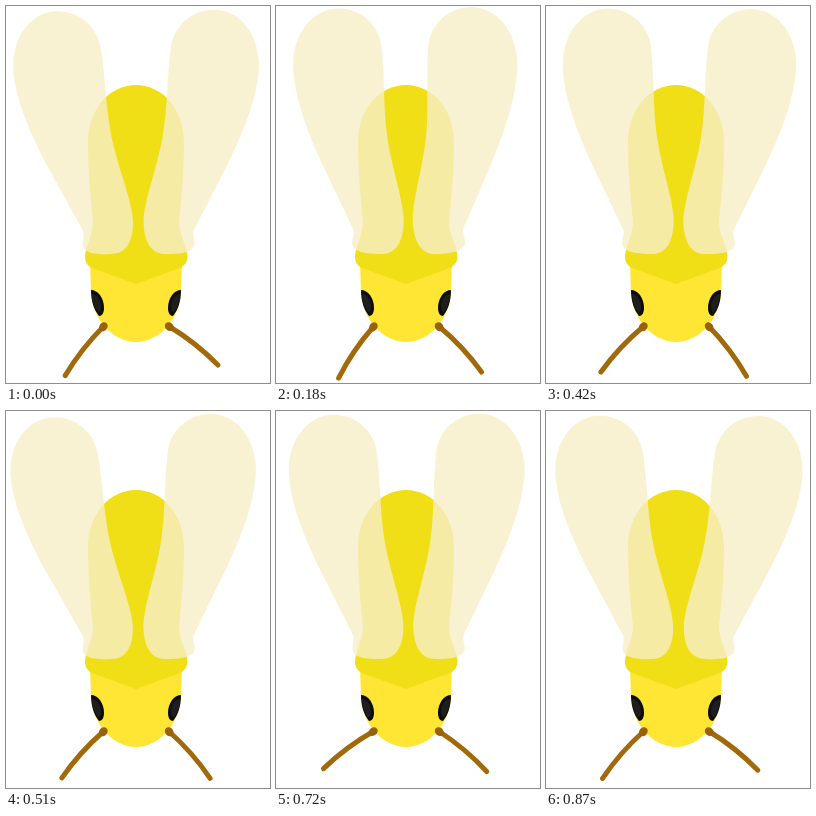
Animation, 264 px wide and 377 px high, one loop 900 ms. Source, as an HTML page with a canvas:

```html
<!DOCTYPE html>
<html lang="en">
<head>
<meta charset="utf-8">
<title>Bee</title>
<style>
  html, body { margin: 0; width: 100%; height: 100%; overflow: hidden; background: #fff; }
  canvas { display: block; }
</style>
</head>
<body>
<canvas id="stage" width="264" height="377"></canvas>
<script>
const ctx = document.getElementById('stage').getContext('2d');
const LOOP = 900, STEP = 30;

// Each part swings between a few turning points [ms, value], easing in and out.
// Wings: x of the outer edge. Antennae: sideways reach of the tip.
const leftWing = swing([50, 5], [310, 29.5], [535, 3], [775, 14]);
const rightWing = swing([120, 25], [450, 14.5], [690, 18], [820, 5]);
const leftAntenna = swing([100, 34.5], [430, 43.5], [560, 42], [720, 51]);
const rightAntenna = swing([40, 50], [345, 35], [500, 42], [780, 49.5]);

function swing(...turns) {
  const [firstMs, first] = turns[0];
  const path = [...turns, [firstMs + LOOP, first]];
  return t => {
    if (t < firstMs) t += LOOP;
    const i = path.findIndex(([ms]) => ms > t);
    const [[t0, a], [t1, b]] = [path[i - 1], path[i]];
    return a + (b - a) * (1 - Math.cos(Math.PI * (t - t0) / (t1 - t0))) / 2;
  };
}

function mirrored(axis, draw) {
  ctx.save();
  ctx.translate(2 * axis, 0);
  ctx.scale(-1, 1);
  draw();
  ctx.restore();
}

const fill = (color, d) => { ctx.fillStyle = color; ctx.fill(new Path2D(d)); };

function wing(edge) {
  ctx.save();
  ctx.translate(104, 228);
  ctx.rotate((edge - 6) / 178);
  ctx.translate(-104, -228);
  fill('rgba(247,239,199,.8)', `M105 248 C120 248 127 236 127 217 C127 196 112 164 105 130
    C99 100 99 72 94 42 C90 19 71 5.5 51 5.5 C25 5.5 6.5 30 6.5 60
    C7 92 26 132 42 162 L77 225 C79 230 76 235 77 240
    C78 247 91 249 105 248 Z`);
  ctx.restore();
}

function antenna(reach) {
  ctx.save();
  ctx.translate(98, 320);
  ctx.rotate(Math.asin(reach / 63.6));
  ctx.strokeStyle = '#a06a0c';
  ctx.lineWidth = 5;
  ctx.lineCap = 'round';
  ctx.beginPath();
  ctx.moveTo(0, 0);
  ctx.quadraticCurveTo(-4, 32, 0, 63);
  ctx.stroke();
  ctx.fillStyle = '#996209';
  ctx.beginPath();
  ctx.ellipse(0, 1, 4, 4.8, 0, 0, 7);
  ctx.fill();
  ctx.restore();
}

function eye() {
  fill('#0c0c0c', 'M85 284 C92 284 98 292 98 302 C98 307 96 310 93 310 C88 304 85 295 85 284 Z');
  fill('#1e1e1e', 'M86 288 C91 288 95 294 95 301 C95 304 94 306 92 306 C88 301 86 295 86 288 Z');
}

function body() {
  fill('#ffe635', 'M84 255 L85 286 C86 312 106 336 130 336 C154 336 174 312 175 286 L176 255 Z');
  fill('#f0df17', `M130 79 C103 79 82 104 82 136 C82 170 85 195 87 215
    C87 230 79 240 79 251 C79 256 82 260 86 262 L130 278 L174 262
    C178 260 181.5 256 181.5 251 C181.5 240 173 230 173 215
    C175 195 178 170 178 136 C178 104 157 79 130 79 Z`);
}

function draw(t) {
  ctx.fillStyle = '#fff';
  ctx.fillRect(0, 0, 264, 377);
  body();
  eye();
  mirrored(130, eye);
  antenna(leftAntenna(t));
  mirrored(130.25, () => antenna(rightAntenna(t)));
  wing(leftWing(t));
  mirrored(132.5, () => wing(rightWing(t)));
}

const start = performance.now();
function frame() {
  const t = Math.max(0, performance.now() - start) % LOOP;
  draw(Math.floor(t / STEP) * STEP);
  requestAnimationFrame(frame);
}
frame();
</script>
</body>
</html>
```
